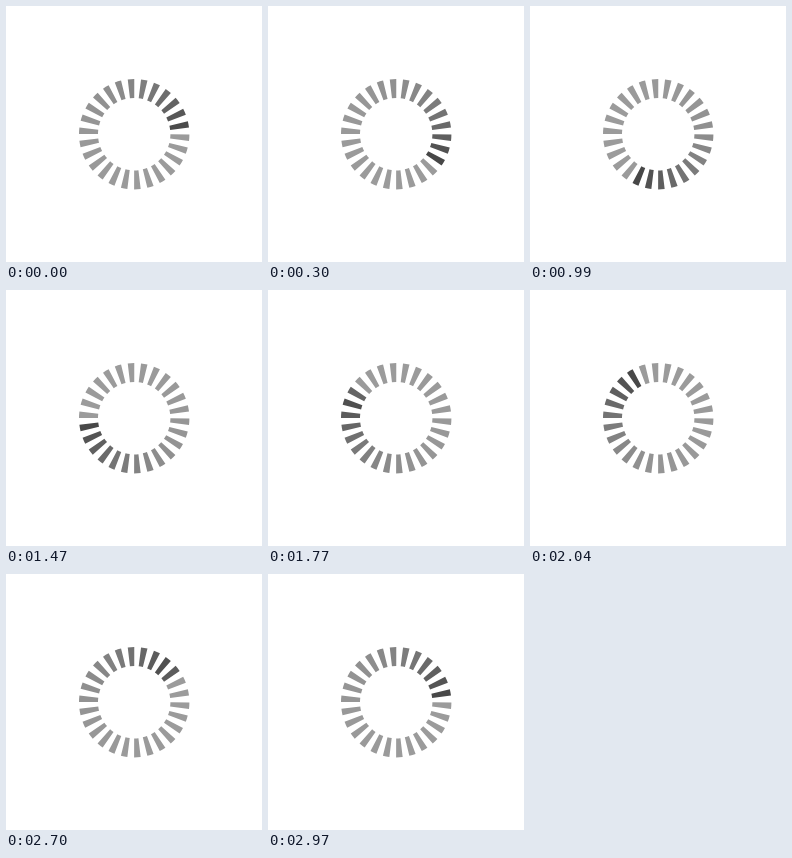
Animation of 256 by 256 pixels, one loop 3 s. Source, as an HTML page with a canvas:

```html
<!DOCTYPE html>
<html lang="en">
<head>
<meta charset="utf-8">
<title>Loading ring</title>
<style>
  html, body { margin: 0; width: 100%; height: 100%; overflow: hidden; background: #fff; }
  canvas { display: block; width: 256px; height: 256px; }
</style>
</head>
<body>
<canvas id="stage" width="256" height="256"></canvas>
<script>
  const ctx = document.getElementById('stage').getContext('2d');
  const LOOP = 3000, TICK = 30, BARS = 26;
  const CENTER = 128.2, OUTER = 55.2, INNER = 36.2;
  const PITCH = 2 * Math.PI / BARS;
  const FIRST = 3.6 * Math.PI / 180;
  const HALF = 3.4 * Math.PI / 180;
  const LIGHT = 155, DARK = 66;
  const RISE = 0.55;

  // age is counted in bar steps since the head reached the bar
  function strength(age) {
    const tail = Math.exp(-Math.pow(age / 5.5, 1.3));
    return age < RISE ? tail * age / RISE : tail;
  }

  function drawBar(i, level) {
    const angle = FIRST + i * PITCH;
    const v = Math.round(LIGHT + (DARK - LIGHT) * level);
    ctx.fillStyle = `rgb(${v},${v},${v})`;
    ctx.beginPath();
    ctx.arc(CENTER, CENTER, OUTER, angle - HALF, angle + HALF);
    ctx.arc(CENTER, CENTER, INNER, angle + HALF, angle - HALF, true);
    ctx.fill();
  }

  function draw(ms) {
    const time = Math.floor((ms % LOOP) / TICK) * TICK;
    const head = time / LOOP * BARS;
    ctx.fillStyle = '#fff';
    ctx.fillRect(0, 0, 256, 256);
    for (let i = 0; i < BARS; i++) {
      drawBar(i, strength((head - i + BARS) % BARS));
    }
  }

  let start = null;
  function frame(now) {
    if (start === null) start = now;
    draw(Math.max(0, now - start));
    requestAnimationFrame(frame);
  }
  draw(0);
  requestAnimationFrame(frame);
</script>
</body>
</html>
```
